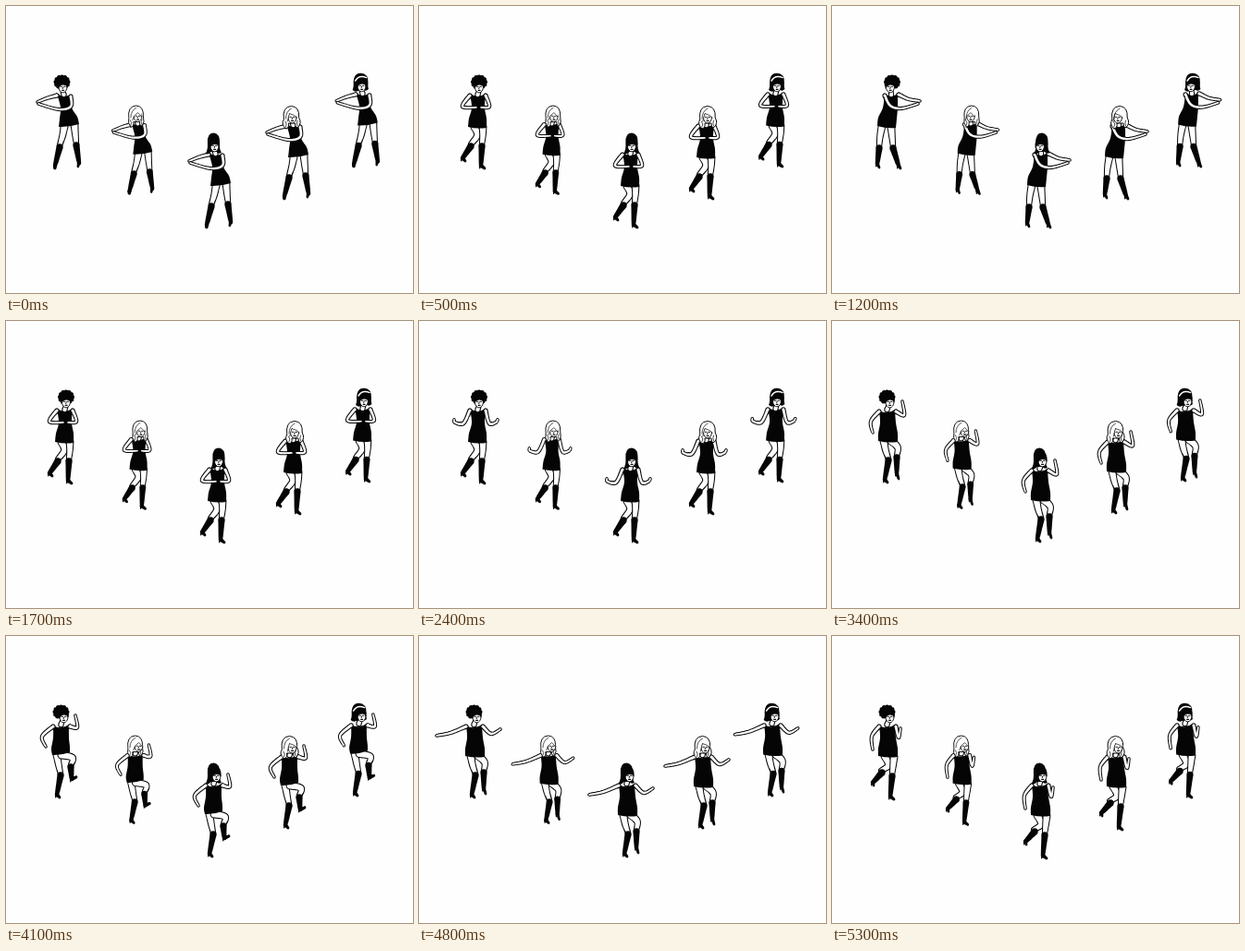
Write an HTML page with a canvas that moves like this. It is 440 by 311 pixels and loops after 5.8 s.

```html
<!DOCTYPE html>
<html lang="en">
<head>
<meta charset="utf-8">
<title>Five dancers</title>
<style>
html, body { margin: 0; width: 100%; height: 100%; overflow: hidden; background: #fefefe; }
canvas { display: block; width: 440px; height: 311px; }
</style>
</head>
<body>
<canvas id="stage"></canvas>
<script>
const W = 440, H = 311, LOOP = 5800;
const INK = '#050505', PAPER = '#fefefe';
const canvas = document.getElementById('stage');
const ctx = canvas.getContext('2d');
const ratio = Math.max(1, window.devicePixelRatio || 1);
canvas.width = W * ratio;
canvas.height = H * ratio;

// Points are x,y pairs measured from the middle of the dancer's face.
// head: x, y, turn. sides: dress edges from shoulder to hem.
// legs: hip, knee, boot top. boots: top, ankle, toe.
const front = {
  head: [2, 0, 0],
  sideL: [-8, 9, -6, 24, -9, 36, -10, 45], sideR: [9, 9, 8, 24, 10, 36, 10, 46],
  legL: [-3, 45, 0, 54, -7, 64], bootL: [-7, 64, -16, 79, -13, 82],
  legR: [6, 45, 6, 54, 5, 64], bootR: [5, 64, 4, 87, 8, 90]
};
const side = {
  head: [-3.5, 0, 3],
  sideL: [-12, 11, -11, 24, -13, 36, -13, 44], sideR: [5, 10, 6, 24, 8, 36, 8, 45]
};
const step = {
  ...side,
  legL: [-7, 44, -5, 54, -2, 63], bootL: [-2, 63, -6, 86, -3, 89],
  legR: [1, 44, 8, 51, 7, 60], bootR: [7, 60, 7, 79, 9, 85]
};

const poses = {
  left: {
    head: [-2.5, 0, 1], sway: [0, 0, -1, 1, 1],
    sideL: [-8, 9, -4, 24, -5, 36, -6, 45], sideR: [7, 10, 8, 24, 14, 34, 16, 42],
    armL: [-8, 11, -19, 14, -29, 18], armR: [7, 12, 7, 23, -6, 26, -28, 20],
    legL: [0, 45, -2, 55, -5, 65], bootL: [-5, 65, -10, 87, -10, 90],
    legR: [11, 43, 12, 54, 13, 63], bootR: [13, 63, 16, 84, 15, 88]
  },
  clasp: { ...front, armL: [-8, 11, -16, 23, -1, 24], armR: [9, 11, 13, 23, 4, 24] },
  right: {
    head: [2, 0, -2], sway: [0, 6, -3, -1, 3],
    sideL: [-6, 9, -8, 24, -13, 35, -14, 44], sideR: [8, 9, 8, 24, 7, 36, 6, 46],
    armR: [9, 10, 20, 15, 32, 17], armL: [-6, 11, 0, 22, 12, 25, 30, 20],
    legL: [-9, 44, -11, 55, -12, 66], bootL: [-12, 66, -14, 85, -12, 89],
    legR: [1, 46, 2, 56, 3, 66], bootR: [3, 66, 9, 87, 11, 90]
  },
  open: {
    ...front,
    armL: [-8, 11, -15, 25, -24, 24, -25, 21], armR: [9, 11, 13, 25, 20, 24, 22, 21]
  },
  wide: {
    ...front, head: side.head,
    armL: [-8, 11, -20, 20, -35, 22], armR: [8, 11, 14, 20, 23, 17]
  },
  step: { ...step, armL: [-12, 12, -21, 23, -19, 35], armR: [6, 12, 15, 16, 13, 1] },
  knee: {
    ...side,
    sideL: [-12, 11, -12, 24, -14, 36, -13, 43], sideR: [5, 10, 5, 24, 6, 34, 6, 40],
    armL: [-12, 12, -24, 23, -20, 34], armR: [6, 12, 14, 13, 12, 0],
    legL: [-8, 43, -6, 54, -4, 63], bootL: [-4, 63, -8, 86, -5, 89],
    legR: [-3, 43, 9, 46, 7, 54], bootR: [7, 54, 8, 69, 13, 67]
  },
  kick: { ...step, armL: [-12, 12, -29, 19, -44, 22], armR: [6, 12, 15, 20, 25, 15] },
  run: {
    ...side,
    armL: [-12, 12, -20, 23, -19, 37], armR: [6, 12, 9, 24, 11, 14],
    legL: [-6, 44, -2, 54, -10, 60], bootL: [-9, 60, -19, 73, -18, 76],
    legR: [4, 45, 3, 55, 2, 64], bootR: [2, 64, 0, 88, 4, 91]
  }
};

const timeline = [
  [500, 'left'], [1200, 'clasp'], [1700, 'right'], [2400, 'clasp'], [2900, 'open'],
  [3400, 'wide'], [4100, 'step'], [4800, 'knee'], [5300, 'kick'], [LOOP, 'run']
];

const dancers = [
  { x: 63, y: 86, size: 1, hair: 'afro' },
  { x: 143, y: 118, size: 0.95, hair: 'parted' },
  { x: 228, y: 150, size: 1, hair: 'long' },
  { x: 310, y: 119, size: 1, hair: 'wavy' },
  { x: 385, y: 85, size: 0.99, hair: 'band' }
];

function blob(path, color) {
  ctx.beginPath();
  path();
  ctx.fillStyle = color;
  ctx.fill();
}

function line(path, color = INK, width = 1) {
  ctx.beginPath();
  path();
  ctx.strokeStyle = color;
  ctx.lineWidth = width;
  ctx.stroke();
}

function disc(x, y, r) {
  ctx.moveTo(x + r, y);
  ctx.arc(x, y, r, 0, 7);
}

// Smooth curve through the given points, as closely spaced [x, y] pairs.
function spline(p) {
  const last = p.length / 2 - 1, out = [];
  const at = (i, k) => p[Math.max(0, Math.min(last, i)) * 2 + k];
  const mix = (i, k, u) => {
    const a = at(i - 1, k), b = at(i, k), c = at(i + 1, k), d = at(i + 2, k);
    return b + u * ((c - a) + u * ((2 * a - 5 * b + 4 * c - d) + u * (3 * (b - c) + d - a))) / 2;
  };
  for (let n = 0; n <= last * 36; n++) {
    const i = Math.min(last - 1, Math.floor(n / 36)), u = n / 36 - i;
    out.push([mix(i, 0, u), mix(i, 1, u)]);
  }
  return out;
}

// A curve through the points whose radius runs from r0 to r1.
function taper(p, r0, r1, color) {
  const dots = spline(p), end = dots.length - 1;
  blob(() => dots.forEach(([x, y], i) => disc(x, y, r0 + (r1 - r0) * i / end)), color);
}

function limb(p, r0, r1) {
  taper(p, r0, r1, INK);
  taper(p, r0 - 1.05, r1 - 1, PAPER);
}

function boot(p) {
  const [tx, ty, ax, ay, ex, ey] = p;
  taper([tx, ty + 2, ax, ay], 3.7, 2.2, INK);
  taper([ax, ay, ex, ey], 2.2, 1.4, INK);
  line(() => { ctx.moveTo(ax - 1.3, ay); ctx.lineTo(ax - 1.3, ay + 2.8); }, INK, 1.3);
}

function dress(l, r) {
  blob(() => {
    ctx.moveTo(l[0], l[1]);
    for (const [x, y] of spline(l)) ctx.lineTo(x, y);
    ctx.quadraticCurveTo((l[6] + r[6]) / 2, (l[7] + r[7]) / 2 + 2, r[6], r[7]);
    for (const [x, y] of spline(r).reverse()) ctx.lineTo(x, y);
    ctx.quadraticCurveTo((l[0] + r[0]) / 2, l[1] + 5, l[0], l[1]);
  }, INK);
}

function face(t) {
  const oval = () => ctx.ellipse(t, 1.8, 4.5, 6.1, 0, 0, 7);
  blob(oval, PAPER);
  line(oval, INK, 0.9);
  line(() => {
    for (const s of [-2.6, 1]) {
      ctx.moveTo(t + s, 1.3);
      ctx.lineTo(t + s + 1.6, 1.3);
    }
    ctx.moveTo(t + 0.2, 2);
    ctx.lineTo(t - 0.3, 3.6);
  }, INK, 0.9);
  line(() => { ctx.moveTo(t - 0.9, 5.4); ctx.lineTo(t + 1.1, 5.4); }, INK, 1.1);
}

function fringe(t, y) {
  blob(() => {
    ctx.moveTo(t - 5.5, 4);
    ctx.quadraticCurveTo(t - 6, -8, t, -8);
    ctx.quadraticCurveTo(t + 5.5, -8, t + 5, 2);
    ctx.quadraticCurveTo(t + 3.5, y, t + 0.5, y);
    ctx.quadraticCurveTo(t - 3, y, t - 5.5, 4);
  }, INK);
}

function paleHair(t, wavy) {
  const bump = wavy ? 1.6 : 0;
  const shape = () => {
    ctx.moveTo(-6, 14);
    ctx.quadraticCurveTo(-10 - bump, 9, -8.2, 4);
    ctx.quadraticCurveTo(-10, -10, 0, -10.5);
    ctx.quadraticCurveTo(9, -10, 8.2, 2);
    ctx.quadraticCurveTo(10 + bump, 8, 7, 12.5);
    ctx.quadraticCurveTo(4, 13, 4, 8);
    ctx.lineTo(-3, 8);
    ctx.quadraticCurveTo(-2, 13, -6, 14);
  };
  blob(shape, PAPER);
  line(shape);
  face(t + (wavy ? 0 : 1));
  const part = () => {
    ctx.moveTo(t - 5.2, 6);
    ctx.quadraticCurveTo(t - 4, 0, wavy ? t - 3 : t + 1, -2.5);
    ctx.quadraticCurveTo(t + 3, -1, t + 5.2, 2);
  };
  blob(() => {
    part();
    ctx.quadraticCurveTo(7, -9, 0, -9.5);
    ctx.quadraticCurveTo(-9, -8, -7, 5);
  }, PAPER);
  line(() => {
    part();
    ctx.moveTo(-6, 3);
    ctx.quadraticCurveTo(-6, -5, 0, -8);
    ctx.moveTo(-6.5, 6);
    ctx.quadraticCurveTo(-4, 9, -6, 12);
    ctx.moveTo(6.5, 5);
    ctx.quadraticCurveTo(5, 8, 6.5, 11);
  }, INK, 0.7);
}

const hair = {
  afro(t) {
    blob(() => {
      ctx.ellipse(0, -4, 7.6, 7, 0, 0, 7);
      for (let i = 0; i < 11; i++) {
        const a = Math.PI * (0.7 + i * 0.16);
        disc(Math.cos(a) * 6.5, -3.5 + Math.sin(a) * 5.6, 2.5);
      }
    }, INK);
    face(t);
    fringe(t, -0.5);
  },
  parted: t => paleHair(t, false),
  wavy: t => paleHair(t, true),
  long(t) {
    blob(() => {
      ctx.moveTo(-9, 10);
      ctx.quadraticCurveTo(-6, 6, -6.6, -1);
      ctx.quadraticCurveTo(-7.5, -12.5, 0, -12.5);
      ctx.quadraticCurveTo(7, -12, 6.6, -1);
      ctx.quadraticCurveTo(6, 5, 8.5, 9);
      ctx.quadraticCurveTo(5, 11, 3, 8);
      ctx.lineTo(-3, 8);
      ctx.quadraticCurveTo(-5, 11.5, -9, 10);
    }, INK);
    face(t);
    fringe(t, 0);
  },
  band(t) {
    blob(() => {
      ctx.moveTo(-9, 6);
      ctx.quadraticCurveTo(-7.5, 3, -8, -3);
      ctx.quadraticCurveTo(-7.5, -12.5, 0, -12.5);
      ctx.quadraticCurveTo(8.5, -12, 8, -2);
      ctx.quadraticCurveTo(7.5, 3, 8.5, 5);
      ctx.quadraticCurveTo(6, 8, 3, 6);
      ctx.lineTo(-3, 7);
      ctx.quadraticCurveTo(-6, 9, -9, 6);
    }, INK);
    face(t);
    fringe(t, -0.5);
    line(() => {
      ctx.moveTo(-6, -4);
      ctx.quadraticCurveTo(-2, -11, 6.2, -7.5);
    }, PAPER, 1.5);
  }
};

function drawDancer(d, i, pose) {
  const [hx, hy, turn] = pose.head;
  const { sideL, sideR } = pose;
  const sway = pose.sway ? pose.sway[i] : 0;
  ctx.save();
  ctx.translate(d.x + sway, d.y);
  ctx.scale(d.size, d.size);
  limb(pose.legL, 4.5, 3.1);
  limb(pose.legR, 4.5, 3.1);
  boot(pose.bootL);
  boot(pose.bootR);
  dress(sideL, sideR);
  limb([hx + turn / 2, 6, (sideL[0] + sideR[0]) / 2, 10], 2.6, 3.2);
  limb(pose.armL, 2.6, 1.8);
  limb(pose.armR, 2.6, 1.8);
  ctx.translate(hx, hy);
  hair[d.hair](turn);
  ctx.restore();
}

function draw(name) {
  ctx.setTransform(ratio, 0, 0, ratio, 0, 0);
  ctx.lineCap = ctx.lineJoin = 'round';
  ctx.fillStyle = PAPER;
  ctx.fillRect(0, 0, W, H);
  dancers.forEach((d, i) => drawDancer(d, i, poses[name]));
}

const start = performance.now();
let shown = '';

function tick() {
  const t = (performance.now() - start) % LOOP;
  const name = timeline.find(([end]) => t < end)[1];
  if (name !== shown) draw(shown = name);
  requestAnimationFrame(tick);
}
tick();
</script>
</body>
</html>
```
